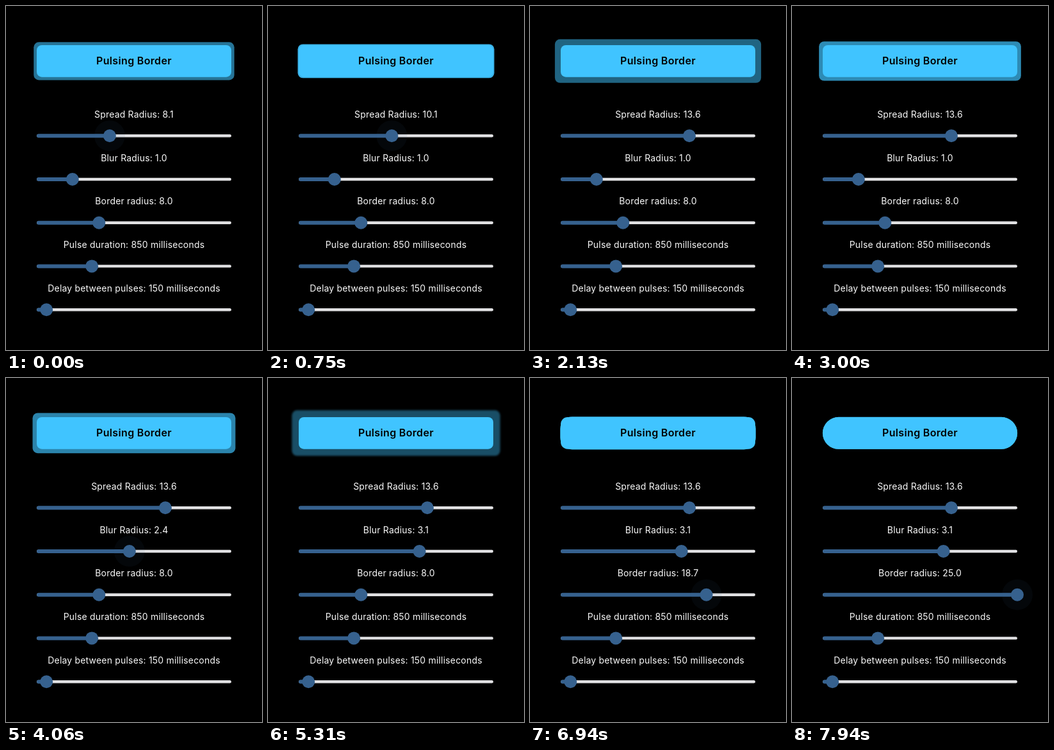
An HTML page for the animation above (8 s loop, 400 by 536 pixels).

```html
<!DOCTYPE html>
<html lang="en">
<head>
<meta charset="utf-8">
<title>Pulsing border settings</title>
<style>
  html, body { margin: 0; width: 100%; height: 100%; overflow: hidden; background: #000; }
  svg { display: block; width: 400px; height: 536px; }
  text { font-family: Inter, Roboto, sans-serif; text-anchor: middle; }
  .label { font-size: 14px; letter-spacing: .19px; fill: #fafafa; }
  .title { font-size: 16px; font-weight: 600; letter-spacing: .33px; }
</style>
</head>
<body>
<svg id="stage" viewBox="0 0 400 536">
  <filter id="soft" filterUnits="userSpaceOnUse" x="0" y="0" width="400" height="180" color-interpolation-filters="sRGB">
    <feGaussianBlur id="blur" stdDeviation="1"/>
  </filter>
  <rect width="400" height="536"/>
  <rect id="halo" fill="#40c4ff" filter="url(#soft)"/>
  <rect id="button" x="48" y="61" width="304" height="49.7" fill="#40c4ff"/>
  <text class="title" x="200" y="91.3">Pulsing Border</text>
</svg>
<script>
const LOOP = 8000, LEFT = 48, WIDTH = 304, PRIMARY = '#36618e';
const PULSE = 850;
const pulseStarts = [-345, 670, 1715, 2755, 3785, 4800, 5880, 6910, 7935];

const byId = id => document.getElementById(id);
const stage = byId('stage'), halo = byId('halo'), button = byId('button'), blur = byId('blur');
const clamp = v => Math.min(1, Math.max(0, v));
const mix = (a, b, u) => a + (b - a) * u;
const set = (el, attrs) => { for (const k in attrs) el.setAttribute(k, attrs[k]); };

function add(tag, attrs) {
  const el = document.createElementNS('http://www.w3.org/2000/svg', tag);
  set(el, attrs);
  return stage.appendChild(el);
}

// Cubic bezier easing from (0,0) to (1,1), solved by bisection.
function bezier(x1, y1, x2, y2) {
  const at = (a, b, s) => 3 * a * s * (1 - s) ** 2 + 3 * b * s * s * (1 - s) + s ** 3;
  return x => {
    let lo = 0, hi = 1;
    for (let i = 0; i < 20; i++) {
      const mid = (lo + hi) / 2;
      if (at(x1, x2, mid) < x) lo = mid; else hi = mid;
    }
    return at(y1, y2, (lo + hi) / 2);
  };
}
const easeOut = bezier(0, 0, .58, 1);
const fastOutSlowIn = bezier(.4, 0, .2, 1);
const drag = (t, t0, t1) => .5 - .5 * Math.cos(Math.PI * clamp((t - t0) / (t1 - t0)));
const press = (t, down, up) => Math.min(clamp((t - down) / 100), clamp((up + 100 - t) / 100));

function slider(y, name, min, max, format) {
  const label = add('text', { class: 'label', x: 200, y: y - 28.5 });
  add('rect', { x: LEFT, y: y - 2.2, width: WIDTH, height: 4.4, rx: 2.2, fill: '#e1e1e3' });
  const active = add('rect', { x: LEFT, y: y - 3, height: 6, rx: 3, fill: PRIMARY });
  const ripple = add('circle', { cy: y, fill: PRIMARY, opacity: .07 });
  const thumb = add('circle', { cy: y, r: 10, fill: PRIMARY });
  return (value, pressed = 0) => {
    const x = WIDTH * (value - min) / (max - min);
    label.textContent = `${name}: ${format(value)}`;
    set(active, { width: x });
    set(ripple, { cx: LEFT + x, r: 24 * pressed });
    set(thumb, { cx: LEFT + x });
  };
}

const decimal = v => v.toFixed(1);
const millis = v => `${Math.round(v)} milliseconds`;
const showSpread = slider(202.2, 'Spread Radius', 1, 20, decimal);
const showBlur = slider(270, 'Blur Radius', .1, 5, decimal);
const showRadius = slider(337.7, 'Border radius', 0, 25, decimal);
const showDuration = slider(405.4, 'Pulse duration', 0, 3000, millis);
const showDelay = slider(473.2, 'Delay between pulses', 0, 3000, millis);
showDuration(PULSE);
showDelay(150);

function draw(t) {
  const spread = mix(8.12, 13.56, drag(t, 50, 1757));
  const blurRadius = mix(1, 3.14, drag(t, 3200, 4610));
  const radius = mix(8, 25, drag(t, 6050, 7576));
  showSpread(spread, press(t, -200, 1850));
  showBlur(blurRadius, press(t, 3100, 4700));
  showRadius(radius, press(t, 5950, 9000));

  // The button's corners trail the slider and catch up once it rests.
  const trailing = mix(8, radius, .25);
  set(button, { rx: mix(trailing, radius, fastOutSlowIn(clamp((t - 7560) / 200))) });

  // Spread and blur grow together while the colour fades.
  const start = pulseStarts.findLast(s => s <= t);
  const u = clamp((t - start) / PULSE);
  const growth = easeOut(u), grow = spread * growth;
  set(halo, {
    x: LEFT - grow, y: 61 - grow,
    width: WIDTH + 2 * grow, height: 49.7 + 2 * grow,
    rx: radius, opacity: 1 - u
  });
  set(blur, { stdDeviation: blurRadius * growth * .6 });
}

const origin = performance.now();
function tick() {
  draw((performance.now() - origin) % LOOP);
  requestAnimationFrame(tick);
}
draw(0);
requestAnimationFrame(tick);
</script>
</body>
</html>
```
